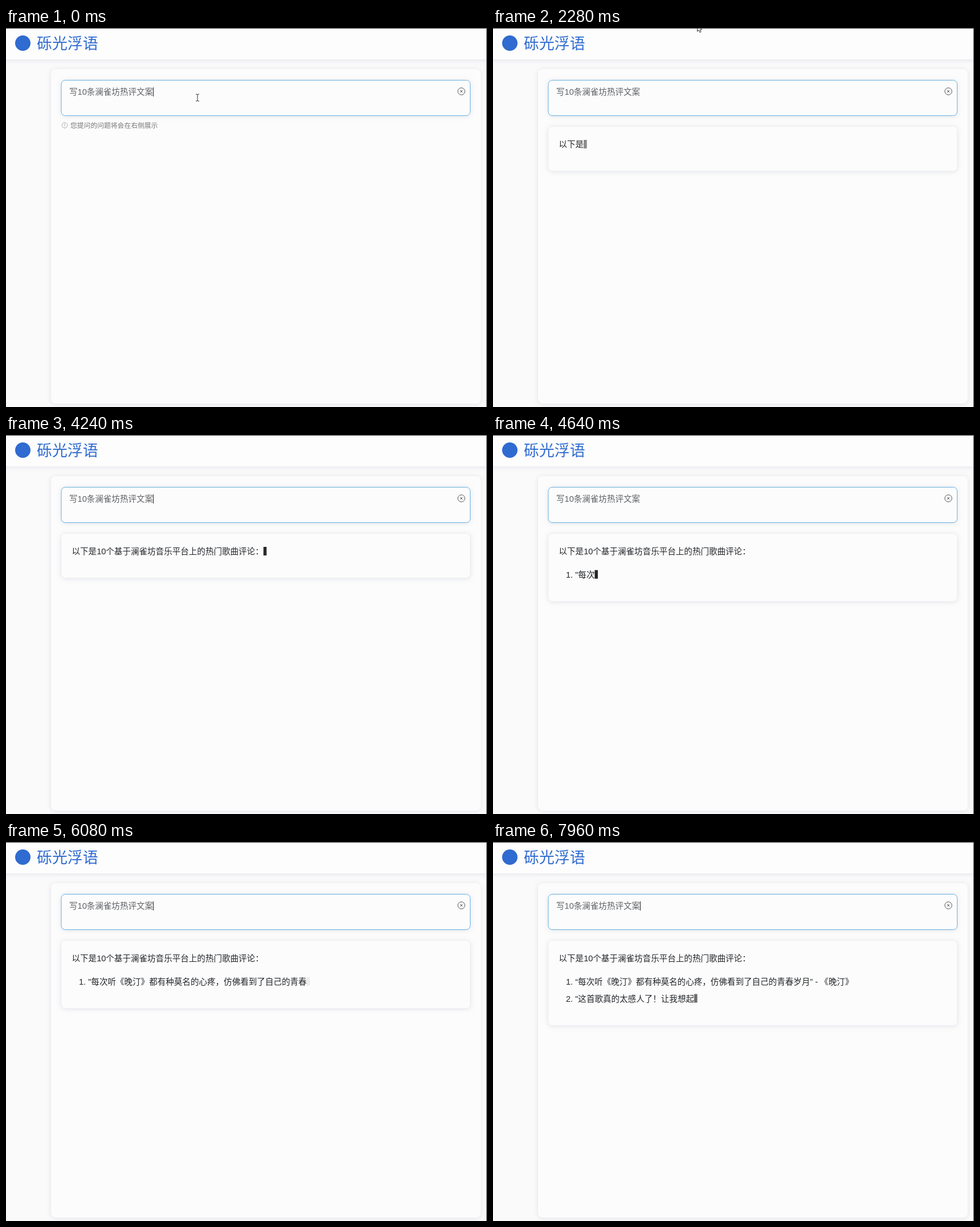
Write an HTML page that moves like this. It is 844 by 664 pixels and loops after 8 s.

```html
<!DOCTYPE html>
<html lang="zh-CN">
<head>
<meta charset="utf-8">
<style>
  html, body { margin: 0; width: 844px; height: 664px; overflow: hidden; background: #fafafb; }
  svg { display: block; font: 14.55px "Liberation Sans", "Noto Sans CJK SC", "Noto Sans CJK", sans-serif; }
  text { white-space: pre; }
  .soft { filter: drop-shadow(0 1px 4px rgba(60, 70, 100, .13)); }
  .line { fill: none; stroke-width: 1; }
</style>
</head>
<body>
<svg width="844" height="664" viewBox="0 0 844 664">
  <rect class="soft" x="-10" y="-10" width="864" height="65" fill="#fdfdfd"/>
  <circle cx="29.5" cy="26.5" r="13.5" fill="#2f6bd0"/>
  <text x="54" y="36.5" font-size="26.9" font-weight="500" fill="#2f6bd0">砾光浮语</text>

  <rect class="soft" x="79" y="72" width="754" height="586" rx="8" fill="#fcfcfc"/>
  <rect class="soft" x="97" y="91.5" width="717.5" height="62" rx="7" fill="#fcfcfc" stroke="#69b0e2"/>
  <text x="111" y="117.3" fill="#606266">写10条澜雀坊热评文案</text>
  <path id="caret" d="M258.5 104v16" stroke="#222"/>
  <g class="line" stroke="#555">
    <circle cx="799" cy="111" r="6.2"/>
    <path d="M797 109l4 4m0-4l-4 4"/>
  </g>

  <g id="hint" fill="#777">
    <circle class="line" cx="103" cy="170.5" r="4.8" stroke="#aaa"/>
    <path d="M103 167.5v4m0 1v1" stroke="#aaa"/>
    <text x="113" y="175.3" font-size="11.8">您提问的问题将会在右侧展示</text>
  </g>

  <g id="answer" fill="#24272b">
    <rect id="card" class="soft" x="97" y="172.5" width="717.5" rx="7" fill="#fcfcfc" stroke="#f0f0f6"/>
    <rect id="thumb" x="809" y="194" width="6" height="15" rx="1" fill="#e9e9ee"/>
    <text class="row" x="115.5" y="209.3"></text>
    <text class="row" x="128" y="250"></text>
    <text class="row" x="128" y="279.7"></text>
    <rect id="block" width="5.5" height="15" fill="#222"/>
  </g>

  <path id="beam" class="line" stroke="#333" d="M-3-6h2l1 1 1-1h2M-3 6h2l1-1 1 1h2M0-5V5"/>
  <path id="arrow" fill="#fff" stroke="#333" d="M.5.5v11.5l2.6-2.4 2 4.2 1.9-.9-1.9-4h3.4z"/>
  <path class="line" d="M0 .5H843.5V664" stroke="#333"/>
</svg>
<script>
const LOOP = 8000, STEP = 40;
const $ = id => document.getElementById(id);
const rows = [...document.querySelectorAll('.row')];
const lines = [
  '以下是10个基于澜雀坊音乐平台上的热门歌曲评论：',
  '"每次听《晚汀》都有种莫名的心疼，仿佛看到了自己的青春岁月" - 《晚汀》',
  '"这首歌真的太感人了！让我想起'
];
const prefixes = ['', '1. ', '2. '];
const rowStart = [1640, 4280, 6640];
const cardHeights = [69, 78, 119, 149];

// [time, characters typed so far]
const typing = [[2000, 0], [2280, 3], [4080, 24], [4320, 24], [4960, 31], [5000, 32],
  [5240, 37], [5800, 46], [6560, 61], [7040, 61], [7920, 76]];
const mouseX = [[1120, 336], [1440, 319], [1640, 319], [2280, 358], [2440, 362]];
const mouseY = [[1120, 122], [1440, 13], [1640, 13], [2280, -6], [2440, -18]];

function track(points, t) {
  if (t <= points[0][0]) return points[0][1];
  for (let i = 1; i < points.length; i++) {
    const [a, from] = points[i - 1], [b, to] = points[i];
    if (t <= b) return from + (to - from) * (t - a) / (b - a);
  }
  return points.at(-1)[1];
}

const show = (id, on) => $(id).setAttribute('visibility', on ? 'inherit' : 'hidden');
const move = (id, x, y) => $(id).setAttribute('transform', `translate(${x} ${y})`);

// A closed pair of straight quotes turns curly.
const curl = s => s.replace(/"([^"]+)"/, '“$1”');

function drawAnswer(t) {
  $('answer').setAttribute('visibility', t >= 360 ? 'visible' : 'hidden');
  show('thumb', t < rowStart[0]);
  show('block', t >= rowStart[0]);
  const open = rowStart.filter(start => t >= start).length;
  $('card').setAttribute('height', cardHeights[open]);

  let left = Math.floor(track(typing, t) + 1e-6), active = 0;
  rows.forEach((row, i) => {
    const count = Math.max(0, Math.min(left, lines[i].length));
    left -= count;
    if (count) active = i;
    row.textContent = i < open ? prefixes[i] + curl(lines[i].slice(0, count)) : '';
  });
  const row = rows[active];
  const width = row.textContent ? row.getComputedTextLength() : 0;
  move('block', +row.getAttribute('x') + width, row.getAttribute('y') - 13.3);
  $('block').setAttribute('opacity', .5 + .5 * Math.cos(2 * Math.PI * (t - 4215) / 407));
}

function draw(t) {
  show('hint', t < 40);
  show('caret', t < 360 || (t >= 1120 && t < 1280) || (t >= 1760 && (t - 1760) % 1000 < 500));
  drawAnswer(t);

  const x = track(mouseX, t), y = track(mouseY, t);
  show('beam', y > 91);
  show('arrow', y <= 91);
  move('beam', x, y);
  move('arrow', x, y);
}

function tick() {
  draw(Math.floor(performance.now() % LOOP / STEP) * STEP);
  requestAnimationFrame(tick);
}
tick();
</script>
</body>
</html>
```
